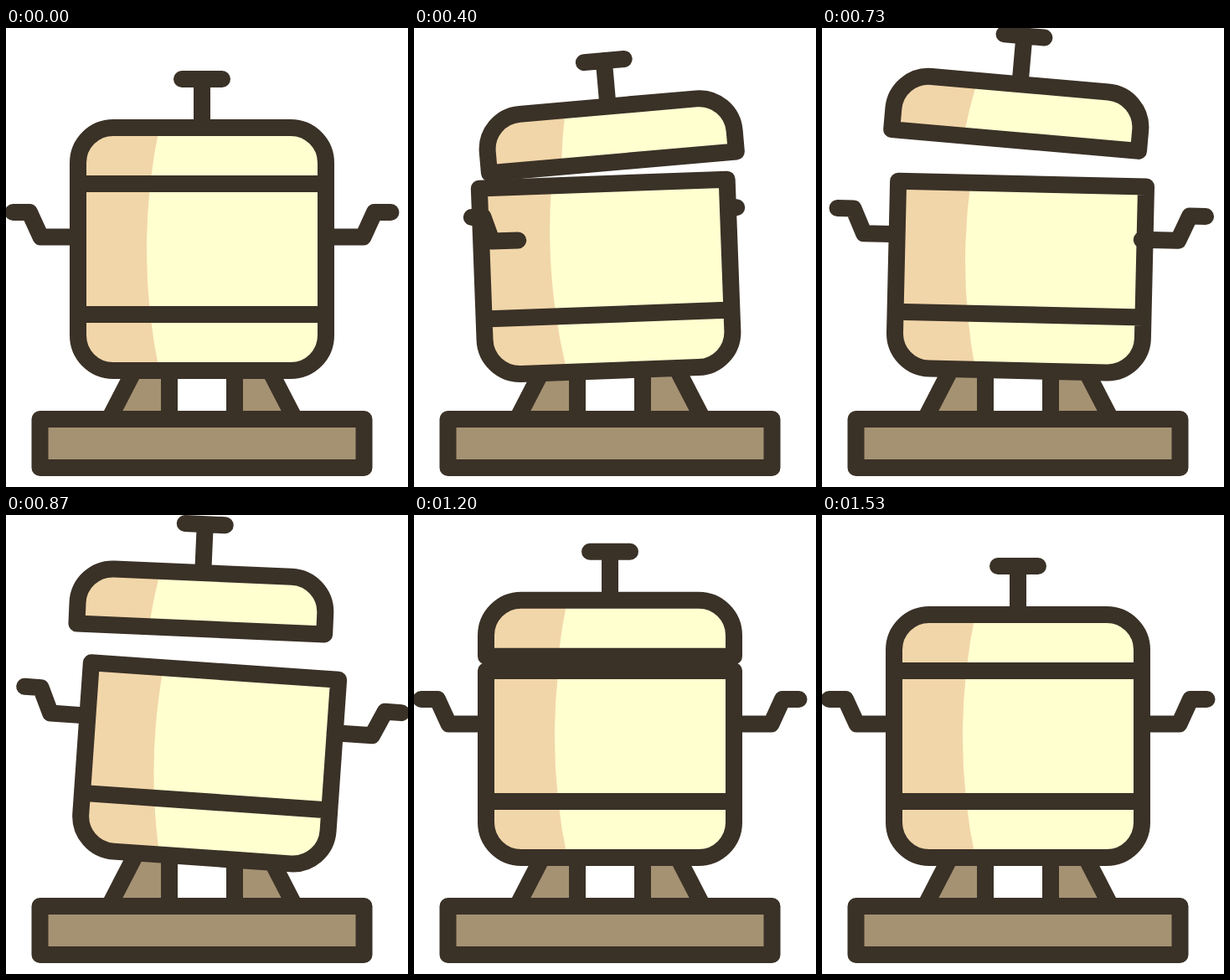
These frames come from a looping animation (480x548 px, 1590 ms). An HTML page:

```html
<!DOCTYPE html>
<html lang="en">
<head>
<meta charset="utf-8">
<title>Cooking pot</title>
<style>
  html, body { margin: 0; width: 100%; height: 100%; overflow: hidden; background: #fff; }
  svg { display: block; width: 480px; height: 548px; }
  .line { fill: none; stroke: #3a3127; stroke-width: 20; stroke-linecap: round; stroke-linejoin: round; }
  .cream { fill: #ffffd0; }
  .tan { fill: #f1d6a9; }
  .wood { fill: #a59272; }
</style>
</head>
<body>
<svg viewBox="0 0 480 548">
  <g id="stand">
    <path class="wood" d="M153 409H195V467H123ZM273 409H315L345 467H273Z"/>
    <path class="line" d="M153 409L123 467M195 409V467M273 409V467M315 409L345 467"/>
    <rect class="wood" x="40.5" y="467" width="387" height="58"/>
    <rect class="line" x="40.5" y="467" width="387" height="58"/>
  </g>
  <g id="pot">
    <polyline id="back" class="line"/>
    <path class="cream" d="M86 186H382V367A42 42 0 0 1 340 409H128A42 42 0 0 1 86 367Z"/>
    <path class="tan" d="M86 186H172.3A707 707 0 0 0 183 409H128A42 42 0 0 1 86 367Z"/>
    <path class="line" d="M86 186H382V367A42 42 0 0 1 340 409H128A42 42 0 0 1 86 367ZM86 342H382"/>
    <polyline id="front" class="line"/>
  </g>
  <g id="lid">
    <path id="knob" class="line" d="M210 61H258M234 61V118"/>
    <path class="cream" d="M86 186V161A42 42 0 0 1 128 119H340A42 42 0 0 1 382 161V186Z"/>
    <path class="tan" d="M86 186V161A42 42 0 0 1 128 119H183A707 707 0 0 0 172.3 186Z"/>
    <path class="line" d="M86 186V161A42 42 0 0 1 128 119H340A42 42 0 0 1 382 161V186Z"/>
  </g>
</svg>
<script>
const LOOP = 1590, STEP = 200 / 3, CX = 234;
const $ = id => document.getElementById(id);
const pot = $('pot'), lid = $('lid'), knob = $('knob'), front = $('front'), back = $('back');

const sine = u => (1 - Math.cos(Math.PI * u)) / 2;
const fall = u => u * u;
const rise = u => u * (2 - u);

// Keys are [step, value, easing into this key].
const spin = [[2.6, 0], [12.75, Math.PI]];
const potTilt = [[4, 0], [8, -4.24], [12.9, 4], [15.4, 0]];
const lidTilt = [[4, 0], [6, -5], [11, 5], [15, 0]];
const lidY = [[4, 0], [8, -51], [12, -52], [17, 0, fall], [19, -23, rise],
              [21, 0, fall], [22, -6, rise], [23, 0, fall]];
const knobY = [[0, 0], [4, 13], [7, 0]];

function at(keys, n) {
  const i = keys.findIndex(k => k[0] > n);
  if (i < 0) return keys[keys.length - 1][1];
  if (i === 0) return keys[0][1];
  const [t0, v0] = keys[i - 1], [t1, v1, ease = sine] = keys[i];
  return v0 + (v1 - v0) * ease((n - t0) / (t1 - t0));
}

// Distance from the pot's axis and height of each handle joint.
const joints = [[148, 249.5], [192.5, 249.5], [206, 220], [225.5, 220]];
const handle = side => joints.map(([r, y]) => `${CX + r * side},${y}`).join(' ');

function draw(n) {
  const side = Math.cos(at(spin, n));
  front.setAttribute('points', handle(-side));
  back.setAttribute('points', handle(side));
  pot.setAttribute('transform', `rotate(${at(potTilt, n)} ${CX} 409)`);
  lid.setAttribute('transform', `translate(0 ${at(lidY, n)}) rotate(${at(lidTilt, n)} ${CX} 147)`);
  knob.setAttribute('transform', `translate(0 ${at(knobY, n)})`);
}

// 15 steps a second, each starting on a whole hundredth of a second.
function tick() {
  const t = Math.floor(performance.now() % LOOP / 10) * 10;
  draw(Math.floor((t + 3.4) / STEP));
  requestAnimationFrame(tick);
}
tick();
</script>
</body>
</html>
```
